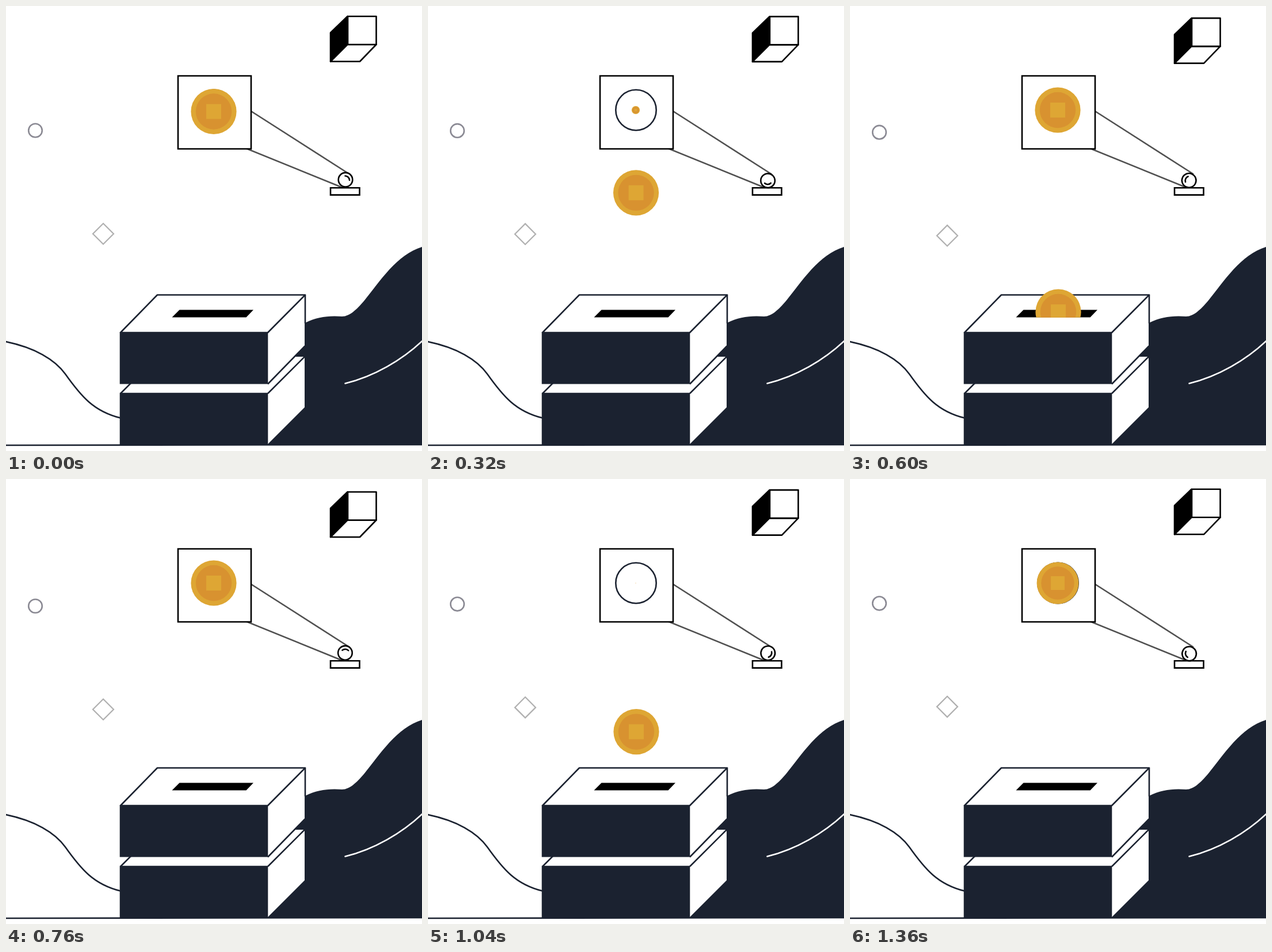
Write an HTML page that moves like this. It is 723x774 px and loops after 1400 ms.

```html
<!DOCTYPE html>
<html lang="en">
<head>
<meta charset="utf-8">
<title>Coin drop</title>
<style>
  html, body { margin: 0; width: 100%; height: 100%; overflow: hidden; background: #fff; }
  svg { display: block; width: 100vw; height: 100vh; }
</style>
</head>
<body>
<svg viewBox="0 0 723 774" fill="none" stroke-width="2.6">
  <defs>
    <clipPath id="slotClip"><path d="M0 0H723V541.8H0Z"/></clipPath>
    <g id="coin">
      <circle r="39.6" fill="#dea634"/>
      <circle r="31.2" fill="#d89230"/>
      <rect x="-13" y="-13" width="26" height="26" fill="#dea634"/>
    </g>
  </defs>

  <!-- landscape -->
  <path fill="#1b2230" d="M455 764V590L520 551C540 541 561 538 584 540C622 540 655 440 723 419V764Z"/>
  <path stroke="#fff" stroke-linecap="round" d="M589.5 656.5C640 644 688 616 724 582"/>
  <g stroke="#1b2230">
    <path d="M-2 583.5C50 594 85 615 103 640C130 678 152 705 199 716.5"/>
    <path d="M0 764L723 763"/>
  </g>

  <!-- ballot box -->
  <g stroke="#1b2230">
    <path fill="#fff" stroke="none" d="M199 674L263 610H519V698L455 762H199Z"/>
    <path d="M199 674L263 610M455 674L519 610"/>
    <path fill="#1b2230" stroke="none" d="M197.7 672.7H455.3V764H197.7Z"/>
    <path fill="#fff" stroke="none" d="M199 568L263 502.5H519V590.5L455 656H199Z"/>
    <path d="M455 657.5L519.5 591.5M520 502.5V552"/>
    <path fill="#fff" stroke-linejoin="round" d="M199 568L263 502.5H520L455 568Z"/>
    <path fill="#1b2230" stroke="none" d="M197.7 567H455.3V657.5H197.7Z"/>
  </g>
  <path fill="#000" d="M301.5 528.5H430L417.5 541.5H288.5Z"/>

  <!-- projector -->
  <path stroke="#505050" d="M426 183L597 292.5M418 248L584 315.5"/>
  <path stroke="#000" fill="#fff" d="M299 121.5H426V248.5H299Z"/>
  <path stroke="#000" fill="#fff" d="M564 316.2H614.5V328.6H564Z"/>
  <g id="ball" stroke="#000">
    <circle cx="590" cy="302.2" r="12.3" fill="#fff"/>
    <path stroke-linecap="round" d="M589.5 295.5A7.8 7.8 0 0 1 597 303"/>
  </g>
  <circle cx="361.5" cy="181" r="35.2" stroke="#1b2230" fill="#fff"/>

  <!-- floating shapes -->
  <g id="floaters">
    <circle cx="51" cy="216.5" r="11.8" stroke="#8b8a94"/>
    <path stroke="#b0b0b0" stroke-width="2.2" d="M169 378.2L187 396.3L169 414.3L151 396.3Z"/>
    <g stroke="#000" stroke-linejoin="round">
      <path fill="#000" d="M564 46.5L593.5 18V67L564 96.5Z"/>
      <path fill="#fff" d="M564 96.5L593.5 67H643.5L615 96.5Z"/>
      <path fill="#fff" d="M594 18H643.5V67H594Z"/>
    </g>
  </g>

  <g clip-path="url(#slotClip)">
    <use id="coinA" href="#coin"/>
    <use id="coinB" href="#coin"/>
  </g>
</svg>
<script>
  const LOOP = 1400, STEP = 40;
  const $ = id => document.getElementById(id);
  const ball = $('ball'), floaters = $('floaters'), coinA = $('coinA'), coinB = $('coinB');
  const ramp = (t, from, to) => Math.min(1, Math.max(0, (t - from) / (to - from)));

  // time, vertical offset
  const bob = [[0, 0], [320, .4], [480, 1.2], [620, 3.5], [760, 4.5],
               [880, 3.5], [1040, 1.1], [1200, -.8], [1360, -.2], [1400, 0]];

  function lerpKeys(keys, t) {
    const i = keys.findIndex(k => k[0] > t);
    const [t0, v0] = keys[i - 1], [t1, v1] = keys[i];
    return v0 + (v1 - v0) * ramp(t, t0, t1);
  }

  // constant acceleration, then steady speed
  function easedFall(t) {
    const speed = .74, accel = 258;
    return 2.5 + speed * (t < accel ? t * t / (2 * accel) : t - accel / 2);
  }

  const quickFall = t => t > 0 ? 1.252 * Math.pow(t, .946) : 0;

  function placeCoin(el, drop, scale) {
    const x = 361 + Math.min(1, drop / 260);
    el.setAttribute('transform', `translate(${x} ${181 + drop}) scale(${scale})`);
    el.setAttribute('visibility', scale > 0 ? 'visible' : 'hidden');
  }

  function draw(t) {
    floaters.setAttribute('transform', `translate(0 ${lerpKeys(bob, t)})`);
    ball.setAttribute('transform', `rotate(${.418 * t} 590 303.1)`);
    placeCoin(coinA, quickFall(t - 760), ramp(t, 265, 572));
    if (t < 1000) placeCoin(coinB, easedFall(t), 1);
    else placeCoin(coinB, 0, ramp(t, 1036, 1388));
  }

  const start = performance.now();
  function tick() {
    const t = (performance.now() - start) % LOOP;
    draw(Math.floor(t / STEP) * STEP);
    requestAnimationFrame(tick);
  }
  tick();
</script>
</body>
</html>
```
